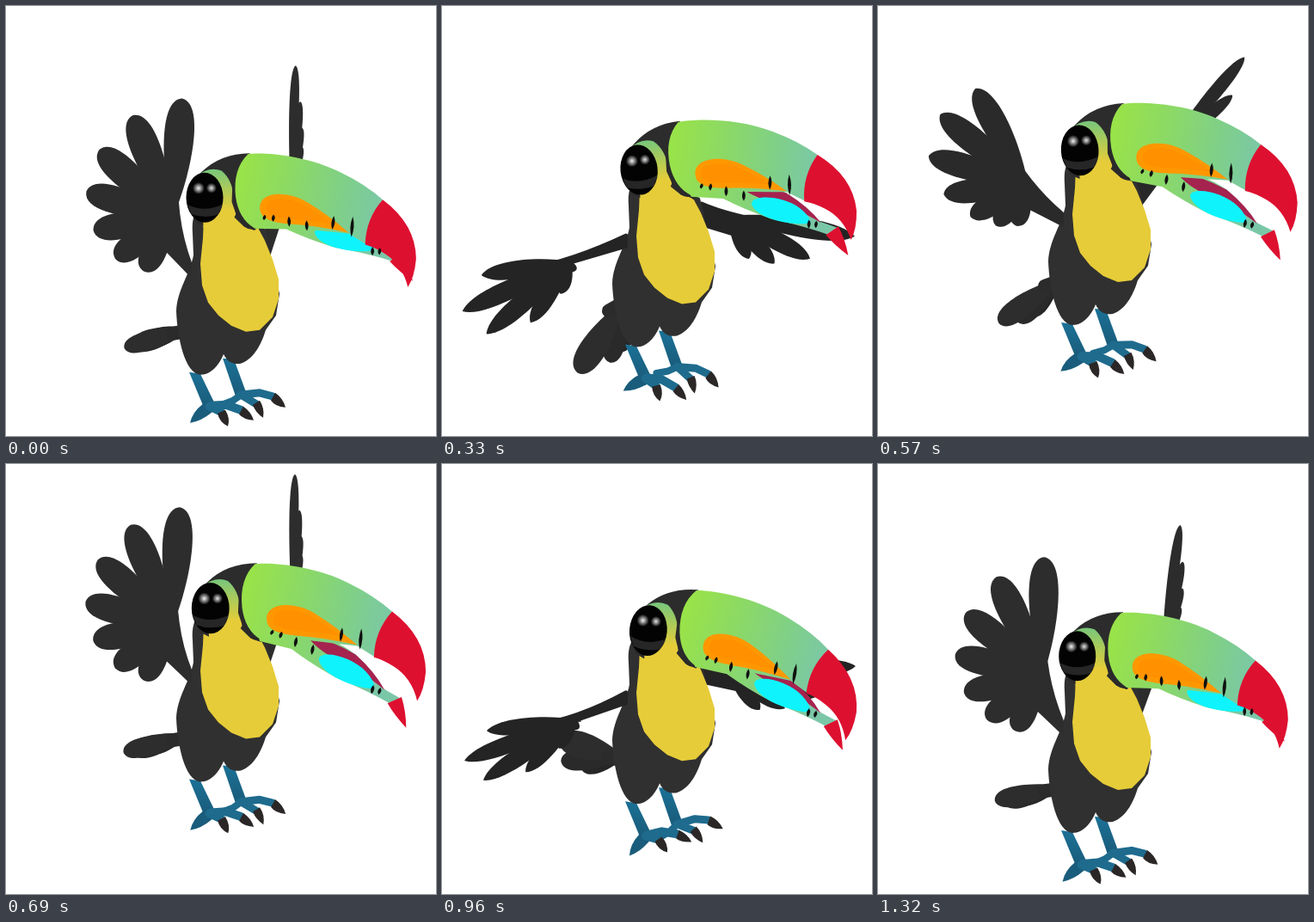
Animation of 500x500 px, one loop 1350 ms. Source, as an HTML page with a canvas:

```html
<!DOCTYPE html>
<html>
<head>
<meta charset="utf-8">
<title>Flapping toucan</title>
<style>
html, body { margin: 0; width: 100%; height: 100%; overflow: hidden; background: #fff; }
canvas { display: block; width: 100%; height: 100%; }
</style>
</head>
<body>
<canvas id="stage" width="500" height="500"></canvas>
<script>
const g = document.getElementById('stage').getContext('2d');
const LOOP = 1350, STEP = 30, TAU = Math.PI * 2, DEG = Math.PI / 180;
const clamp = v => Math.max(0, Math.min(1, v));
const mix = (a, b, k) => a + (b - a) * k;

// Key poses of one flap: time, wrist x y, angle of the first feather, angle between feathers.
const leftWing = {
  side: -1, count: 7, root: [214, 299, 214, 312],
  poses: [[.244, 160, 318, 29, 19], [.311, 165, 330, 0, 10], [.6, 140, 325, -9, 20], [.667, 140, 312, 0, 17], [.99, 194, 245, 94, 26]],
  width: gap => 12 + gap,
  length: (i, fold) => mix(138 - 11 * i, 141 * Math.exp(-(((i - 1.3) / 2.4) ** 2)), fold)
};
const rightWing = {
  side: 1, count: 4, root: [302, 262, 306, 288],
  poses: [[.244, 350, 276, 49, 5], [.311, 335, 280, 27, 14], [.6, 335, 272, -26, 20], [.667, 335, 264, -13, 18], [.99, 331, 217, 87, 4]],
  width: gap => 8 + gap * 1.1,
  length: i => 148 * .72 ** i
};

// Smooth periodic interpolation between key poses.
function sample(keys, p) {
  const n = keys.length;
  const at = i => {
    const turn = Math.floor(i / n), row = keys[i - turn * n];
    return { t: row[0] + turn, v: row.slice(1) };
  };
  let i = n - 1;
  while (i >= 0 && keys[i][0] > p) i--;
  const [a, b, c, d] = [at(i - 1), at(i), at(i + 1), at(i + 2)];
  const span = c.t - b.t, u = (p - b.t) / span, u2 = u * u, u3 = u2 * u;
  return b.v.map((y, k) => {
    const m0 = (c.v[k] - a.v[k]) / (c.t - a.t) * span;
    const m1 = (d.v[k] - y) / (d.t - b.t) * span;
    return (2 * u3 - 3 * u2 + 1) * y + (u3 - 2 * u2 + u) * m0 + (3 * u2 - 2 * u3) * c.v[k] + (u3 - u2) * m1;
  });
}

function fill(d, color) {
  g.fillStyle = color;
  g.fill(new Path2D(d));
}

function line(color, width, ...pts) {
  g.strokeStyle = color;
  g.lineWidth = width;
  g.lineCap = g.lineJoin = 'round';
  g.beginPath();
  for (let i = 0; i < pts.length; i += 2) g.lineTo(pts[i], pts[i + 1]);
  g.stroke();
}

function gradient(x0, y0, x1, y1, ...colors) {
  const grad = g.createLinearGradient(x0, y0, x1, y1);
  colors.forEach((c, i) => grad.addColorStop(i / (colors.length - 1), c));
  return grad;
}

function pivot(x, y, deg, size = 1) {
  g.translate(x, y);
  g.rotate(deg * DEG);
  g.scale(size, size);
  g.translate(-x, -y);
}

function scoped(draw) {
  g.save();
  draw();
  g.restore();
}

// A leaf from its base along an angle; a larger blunt gives a rounder tip.
function feather(x, y, len, angle, w, color, blunt = .5) {
  scoped(() => {
    const reach = len * mix(.86, 1, blunt), swell = w * mix(.62, .78, blunt);
    g.translate(x, y);
    g.rotate(angle);
    g.fillStyle = color;
    g.beginPath();
    g.moveTo(0, 0);
    g.bezierCurveTo(len * .35, w * .45, reach, swell, len, 0);
    g.bezierCurveTo(reach, -swell, len * .35, -w * .45, 0, 0);
    g.fill();
  });
}

function wing({ side, count, root, poses, width, length }, flap) {
  const [wx, wy, lead, gap] = sample(poses, flap);
  const fold = 1 - clamp(lead / 90), w = width(gap);
  const grey = mix(45, 36, fold), color = `rgb(${grey},${grey},${grey})`;
  const [x1, y1, x2, y2] = root;
  const web = [];
  for (let i = 0; i < count; i++) {
    const len = length(i, fold), up = (lead - gap * i) * DEG;
    const dx = side * Math.cos(up), dy = -Math.sin(up);
    feather(wx, wy, len, Math.atan2(dy, dx), w * (.6 + .4 * clamp(len / 130)), color, .8 * (1 - fold));
    web.push([wx + dx * len * .47, wy + dy * len * .47]);
  }
  g.fillStyle = g.strokeStyle = color;
  g.lineWidth = 4;
  g.lineJoin = 'round';
  g.beginPath();
  g.moveTo(x1, y1);
  g.quadraticCurveTo(wx, wy, ...web[0]);
  web.slice(1).forEach(m => g.lineTo(...m));
  g.lineTo(x2, y2);
  g.closePath();
  g.fill();
  g.stroke();
}

function tail(s) {
  const swing = 17 + s * (s > 0 ? 46 : 28), open = Math.abs(s), low = Math.max(0, s);
  const plume = (len, deg, w, color) => feather(212, 375, len, (180 - deg) * DEG, w, color, .8);
  plume(52 + 8 * low, swing + 24 * open, 24, '#262626');
  plume(68 + 6 * open, swing + 14 * open, 27, '#2a2a2a');
  plume(78 + 22 * low, swing - 6 * open, 24 + 10 * open, '#2d2d2d');
  line('#2b2b2b', 16, 210, 378, 194, 381 + 6 * s);
}

function legs(turn) {
  const blue = '#1e6b8d', deep = '#1a5c7b', claw = '#2b2727';
  fill('M252 410L265 411L279 449L267 454Z', gradient(0, 410, 0, 452, '#1b7196', deep));
  fill('M213 426L226 428L242 461L230 467Z', gradient(0, 426, 0, 465, '#1b7196', deep));
  scoped(() => {
    pivot(275, 453, turn);
    line(blue, 8, 274, 452, 264, 459, 251, 464);
    line(blue, 9, 273, 452, 291, 463);
    line(blue, 9, 276, 452, 295, 450, 310, 454);
    fill('M287 464L295 459Q301 468 299 479Q290 473 287 464Z', claw);
    fill('M308 459L313 450Q322 456 325 467Q313 466 308 459Z', claw);
  });
  scoped(() => {
    pivot(240, 465, turn);
    fill('M229 463Q217 472 214 485Q227 483 239 473L246 465Z', deep);
    line(blue, 9, 236, 466, 251, 473);
    line(blue, 10, 238, 465, 256, 464, 273, 470);
    fill('M246 474L255 470Q261 480 258 489Q248 484 246 474Z', claw);
    fill('M271 475L276 466Q285 472 288 482Q276 481 271 475Z', claw);
  });
}

function body() {
  fill('M226 234Q215 242 217 265L218 290C214 312 199 330 198 355C199 385 208 428 226 429C240 429 249 415 253 405C258 416 266 417 273 416C290 410 298 390 302 377L314 360L318 335L300 256L270 236Z', '#303030');
}

function belly() {
  fill('M230 246L264 238L293 258L301 273L310 295L317 318L317 341L310 362L295 377L279 379L262 372L247 360L235 345L228 325L226 300L229 270Z', '#e6cc39');
}

function mark(x, y, h) {
  fill(`M${x + 1} ${y - h}Q${x + 4} ${y} ${x - 1} ${y + h}Q${x - 4} ${y} ${x + 1} ${y - h}Z`, '#101010');
}

function glow(x, y, r, alpha) {
  const grad = g.createRadialGradient(x, y, 0, x, y, r);
  grad.addColorStop(0, `rgba(255,255,255,${alpha})`);
  grad.addColorStop(1, 'rgba(255,255,255,0)');
  g.fillStyle = grad;
  g.fillRect(x - r, y - r, 2 * r, 2 * r);
}

function eye() {
  g.fillStyle = '#030303';
  g.beginPath();
  g.ellipse(231, 223, 21.5, 29, 0, 0, TAU);
  g.fill();
  g.clip();
  fill('M211 231Q230 241 252 231L247 243Q231 248 215 242Z', 'rgba(130,130,130,.28)');
  glow(224, 212, 7, .95);
  glow(239, 212, 6, .9);
}

function head(jaw) {
  const skin = gradient(266, 235, 432, 275, '#98e24a', '#8cd965', '#80d086', '#7ac7a8');
  const hinge = () => pivot(281, 253, jaw);
  fill('M217 240Q210 210 228 193Q250 172 284 172L290 200L291 258Q284 263 276 257L265 246L230 256L218 250Z', '#2c2c2c');
  fill('M221 199Q236 186 251 192Q264 203 265 225L267 243L262 252L229 258L229 240Z',
    gradient(0, 190, 0, 238, '#77c67c', '#aecb58', '#e6cc39'));
  line('#2a2a2a', 5, 266, 208, 265, 228, 270, 243, 278, 255, 288, 259);
  scoped(() => {
    hinge();
    fill('M283 245L335 250Q372 258 396 277Q417 297 427 316L448 328L436 334Q413 320 373 303Q345 287 323 270L287 261Z', skin);
    fill('M340 254Q368 260 396 277Q418 297 429 318Q400 293 375 283Q350 270 340 254Z', '#a5234f');
    fill('M432 333L448 326Q453 342 453 361Q440 347 432 333Z', '#de1030');
    fill('M354 281C359 271 393 280 408 297Q418 308 417 316C401 317 355 301 354 281Z', '#0ff4fc');
  });
  fill('M282 173C300 171 350 175 390 196Q418 210 438 228Q422 250 417 279L398 267Q365 263 340 260L315 259L288 259Q270 248 267 222Q264 190 282 173Z', skin);
  fill('M438 228Q476 257 476 297Q474 318 466 330Q460 304 440 291Q428 283 417 280Q418 250 438 228Z', '#de1030');
  fill('M295 236C295 215 330 216 352 231Q376 246 398 266Q360 257 330 255C308 253 295 248 295 236Z', '#ff9800');
  fill('M302 236C302 222 330 223 346 233Q364 243 380 256Q350 251 330 249C312 247 302 244 302 236Z', 'rgba(255,120,0,.25)');
  mark(402, 259, 12);
  mark(380, 254, 8);
  scoped(() => {
    hinge();
    mark(301, 251, 3);
    mark(311, 254, 4);
    mark(328, 262, 6);
    mark(347, 271, 6);
    mark(415, 317, 5);
    mark(423, 319, 4);
  });
  scoped(eye);
}

function draw(time) {
  const t = Math.floor(time % LOOP / STEP) * STEP;
  const p = t / LOOP, flap = 2 * p % 1;
  const sin = Math.sin(TAU * p), cos = Math.cos(TAU * p);
  g.fillStyle = '#fff';
  g.fillRect(0, 0, 500, 500);
  scoped(() => {
    g.translate(0, 30 * Math.cos(TAU * (t + 25) / LOOP) - 30);
    wing(rightWing, flap);
    tail(sin);
    legs(10.5 * sin);
    body();
    wing(leftWing, flap);
    belly();
    g.translate(3.2 - 3.2 * cos - 5 * sin, 2 - 2 * cos - 2 * sin);
    pivot(231, 223, -.7 - 5.5 * sin, 1 + .01 * (1 - cos) - .004 * sin);
    head(-6 - 6 * cos + 1.8 * sin);
  });
}

const start = performance.now();
function tick() {
  draw(performance.now() - start);
  requestAnimationFrame(tick);
}
tick();
</script>
</body>
</html>
```
